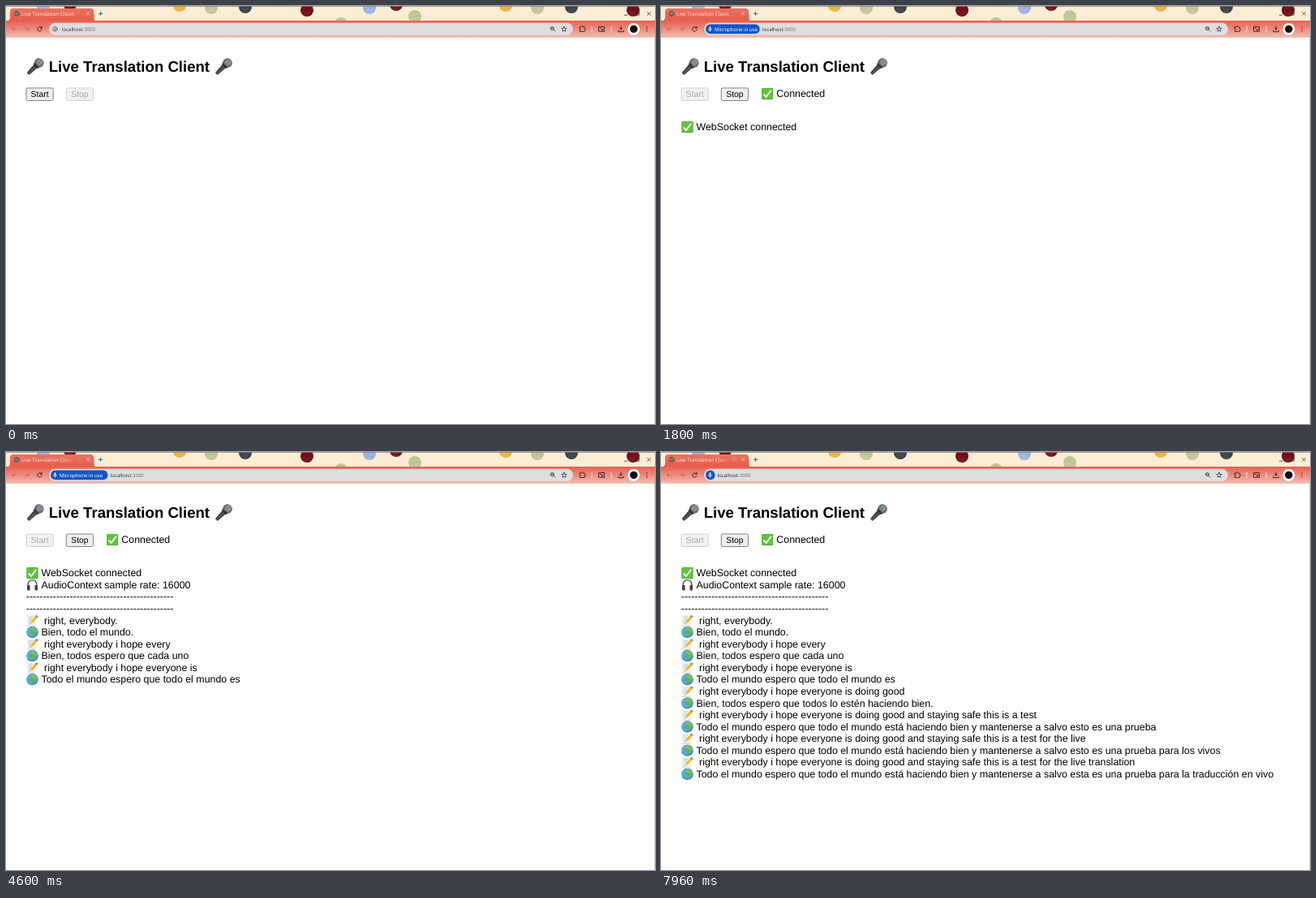
Write an HTML page that moves like this. It is 800 px wide and 515 px high and loops after 8 s.

```html
<!DOCTYPE html>
<html lang="en">
<head>
<meta charset="utf-8">
<title>Live Translation Client</title>
<style>
html, body { margin: 0; width: 100%; height: 100%; overflow: hidden; background: #fefefd; }
svg { display: block; width: 100%; height: 100%; }
text { white-space: pre; text-rendering: geometricPrecision; }
.page { font-family: "Liberation Sans", Arial, sans-serif; font-size: 12.4px; fill: #000; }
.ui { font-family: "Noto Sans", "Open Sans", sans-serif; }
.icon { fill: none; stroke: #33292a; stroke-width: 1; stroke-linecap: round; stroke-linejoin: round; }
</style>
</head>
<body>
<svg viewBox="0 0 800 515">
  <defs>
    <linearGradient id="bar" x2="0" y2="1">
      <stop stop-color="#e7604f"/><stop offset=".5" stop-color="#ee8c7f"/><stop offset="1" stop-color="#f4bdb4"/>
    </linearGradient>
    <linearGradient id="tab" x2="0" y2="1">
      <stop stop-color="#ee7160"/><stop offset="1" stop-color="#e65c4a"/>
    </linearGradient>
    <linearGradient id="fade" gradientUnits="userSpaceOnUse" x1="70" x2="84" y1="0" y2="0">
      <stop stop-color="#fbe6df"/><stop offset="1" stop-color="#fbe6df" stop-opacity="0"/>
    </linearGradient>
    <filter id="shadow" x="-10%" y="-10%" width="120%" height="125%">
      <feDropShadow dx="0" dy="1" stdDeviation="1.3" flood-opacity=".45"/>
    </filter>
    <clipPath id="chipClip"><rect id="chipMask" x="55" y="22" width="12" height="13"/></clipPath>
    <clipPath id="strip"><rect width="800" height="18"/></clipPath>
    <symbol id="mic" viewBox="0 0 22 22">
      <path d="M9.6 8.2 14 12.6 3.4 21.4 .6 18.8Z" fill="#3c4246"/>
      <path d="M10.5 9.5 12 11 3 19.5" fill="none" stroke="#737b80" stroke-width=".9"/>
      <circle cx="15.7" cy="6.6" r="5.9" fill="#697075"/>
      <circle cx="16.6" cy="5.4" r="3.6" fill="#9a9fa2"/>
      <path d="M12 2.5 20 10M14.5 1.2 21.2 7.4M20 2.2 12.2 10M16.8 1 10.6 6.6" stroke="#555b60" stroke-width=".6"/>
      <path d="M9.8 6.3 16 12.6 13.8 13.4 9 8.6Z" fill="#292e31"/>
    </symbol>
    <symbol id="check" viewBox="0 0 16 16">
      <rect x=".3" y=".3" width="15.4" height="15.4" rx="1.6" fill="#4fae35"/>
      <rect x=".8" y=".6" width="14.2" height="13.8" rx="1.3" fill="#62c240"/>
      <path d="M3 8.6 6.3 12.2 13 3.4" fill="none" stroke="#fff" stroke-width="2"/>
    </symbol>
    <symbol id="phones" viewBox="0 0 16 16">
      <path d="M2.3 10V7.3a5.7 5.7 0 0 1 11.4 0V10" fill="none" stroke="#4a5358" stroke-width="1.5"/>
      <rect x="1" y="8.3" width="4.2" height="7" rx="1.6" fill="#3a4146"/>
      <rect x="10.8" y="8.3" width="4.2" height="7" rx="1.6" fill="#3a4146"/>
      <path d="M4.7 9.2v5M11.3 9.2v5" stroke="#9aa5ab" stroke-width="1"/>
    </symbol>
    <symbol id="memo" viewBox="0 0 16 16">
      <path d="M.8.8H12.4V15.4H.8Z" fill="#eef1f3"/>
      <path d="M.8 15H12.4" stroke="#c3ccd1" stroke-width=".8"/>
      <path d="M3 4h6M3 6.5h5M3 9h3M3 11.5h2" stroke="#a9bac3" stroke-width=".7"/>
      <path d="M14 2.6 6.9 10.5" stroke="#ffb31a" stroke-width="3.2"/>
      <path d="M14.6 2 13.3 3.4" stroke="#ef6a68" stroke-width="3.2"/>
      <path d="M13.3 3.4 12.7 4.1" stroke="#8ea1ab" stroke-width="3.2"/>
      <path d="M5.7 9.4 8.1 11.6 4.7 12.9Z" fill="#f2c99b"/>
      <path d="M5.1 11.9 5.8 12.5 4.7 12.9Z" fill="#333"/>
    </symbol>
    <symbol id="globe" viewBox="0 0 16 16">
      <circle cx="8" cy="8" r="7.7" fill="#2f8ad2"/>
      <circle cx="7.4" cy="7.4" r="6.5" fill="#52b0ea"/>
      <path d="M4.4 6.4 6.8 5.6 10.4 6.3 11.6 8.7 12.9 8.9 10.9 11.2 10.3 13.6 9 14.6 8 12.4 7.8 10.4 5 10.2 3.7 8.6Z" fill="#70ad43"/>
      <path d="M5 4.8 5.7 2.6 8.5.8 12.3 1.9 14.9 5.2 14.8 7.6 12.7 7.9 10.9 5.5 8.2 4.1 6.3 4.9Z" fill="#80b84d"/>
      <path d="M7.4 3.3 9 2.2 8.6 3.6ZM8.5 5 11 5.2 9.6 5.7Z" fill="#b9def2"/>
    </symbol>
  </defs>

  <rect width="800" height="515" fill="#fefefd"/>
  <path d="M799.5 39V515" stroke="#d8d8d8"/>

  <rect width="800" height="18" fill="#fbeed5"/>
  <g id="balls" clip-path="url(#strip)"></g>
  <path d="M0 .5H800" stroke="#857d85" opacity=".7"/>
  <path d="M1 18.5Q5 18 5 14V7Q5 3 9 3H104Q108 3 108 7V14Q108 18 112 18.5Z" fill="url(#tab)"/>
  <rect y="18" width="800" height="21" fill="url(#bar)"/>
  <g class="icon">
    <circle cx="13" cy="9.3" r="3.1" fill="#6f6a68" stroke="#5e4b49" stroke-width=".7"/>
    <path d="M10.8 8.4 13 10 15 8" stroke="#b9a9a4" stroke-width=".7"/>
    <path d="M99.4 7.7l3.2 3.2m0-3.2-3.2 3.2" stroke="#fbe6df" stroke-width=".8"/>
    <path d="M114.4 9.3h4.4m-2.2-2.2v4.4" stroke="#1f6fa0"/>
    <path d="M762.5 11.2h3.2M776.6 7.4h3.8v3.8h-3.8ZM790.7 7.6l3.6 3.6m0-3.6-3.6 3.6" stroke-width=".8"/>
    <path d="M13 28.4H7.6m2.3-2.4-2.4 2.4 2.4 2.4M23 28.4h5.4m-2.3-2.4 2.4 2.4-2.4 2.4" stroke="#9d554c" opacity=".65" stroke-width=".8"/>
    <path d="M43.7 26.9a2.7 2.7 0 1 0 .4 2.3M44.2 25.2v2h-2"/>
  </g>
  <text id="title" class="ui" x="19" y="11.5" font-size="6.3">Live Translation Client</text>
  <g id="rec">
    <circle cx="90" cy="9.3" r="2.8" fill="none" stroke="#fbd3ca" stroke-width=".6"/>
    <circle cx="90" cy="9.3" r="1.4" fill="#fbd3ca"/>
  </g>

  <rect x="53" y="20.8" width="646" height="15.2" rx="7.6" fill="#dedddf"/>
  <g id="info" class="icon">
    <circle cx="60.5" cy="28.4" r="2.7" stroke-width=".7"/>
    <path d="M60.5 28.2v1.4M60.5 27v.05" stroke-width=".8"/>
  </g>
  <g id="chip">
    <rect id="chipBody" x="55" y="22.6" width="12" height="11.6" rx="5.8"/>
    <g id="chipMic" fill="none" stroke-width=".8">
      <path d="M60.5 26.2v2.2" stroke-width="1.7" stroke-linecap="round"/>
      <path d="M58.6 28.3a1.9 1.9 0 0 0 3.8 0M60.5 30.3v1.2"/>
    </g>
    <text id="chipText" class="ui" x="66" y="30.5" font-size="6.1" clip-path="url(#chipClip)"></text>
  </g>
  <text id="url" class="ui" x="69" y="30.5" font-size="6.05" fill="#333">localhost<tspan fill="#6f6f72">:3000</tspan></text>
  <g class="icon">
    <circle cx="673.3" cy="27.6" r="2.1" stroke-width=".8"/>
    <path d="M675 29.3l1.8 1.8M672.4 27.6h1.8" stroke-width=".8"/>
    <path d="M688 25.2l.9 2.1 2.3.2-1.7 1.5.5 2.2-2-1.2-2 1.2.5-2.2-1.7-1.5 2.3-.2Z" stroke-width=".8"/>
    <path d="M707.2 26h1.8q0-1.4 1.2-1.4t1.2 1.4h1.8v1.8q1.3 0 1.3 1t-1.3 1v1.6h-6v-1.7q1.3 0 1.3-1t-1.3-1Z" stroke-width=".9"/>
    <path d="M733.5 31.2h-3v-5.6h7v2M735 28.8h2.6v2.6H735ZM732.2 27.5h1.2"/>
    <path d="M722 25v7M746 25v7" stroke="#f8d4cd" stroke-width="1.2"/>
    <path d="M758 25v4m-1.8-1.7 1.8 1.8 1.8-1.8M754.8 30v1.7h6.4V30"/>
  </g>
  <circle cx="773.8" cy="28.4" r="7.5" fill="#fff"/>
  <circle cx="773.8" cy="28.4" r="4.7" fill="#160b0b"/>
  <path d="M790 25.8v.01M790 28.4v.01M790 31v.01" stroke="#33292a" stroke-width="1.5" stroke-linecap="round"/>

  <g class="page">
    <use href="#mic" x="25" y="63.5" width="22" height="22"/>
    <text x="52.7" y="80.6" font-size="18.6" font-weight="700">Live Translation Client</text>
    <use href="#mic" x="257.3" y="63.5" width="22" height="22"/>
    <g id="start"></g>
    <g id="stop"></g>
    <g id="status">
      <use href="#check" x="123.8" y="100.7" width="14.8" height="14.8"/>
      <text x="142.3" y="112.2">Connected</text>
    </g>
    <g id="log"></g>
  </g>

  <g id="popup" class="ui" font-size="6.75" font-weight="500">
    <rect x="53.3" y="36.8" width="142" height="124.4" rx="6" fill="#fff" filter="url(#shadow)"/>
    <text x="62.3" y="53" font-size="8.05" font-weight="600" fill="#1f1f1f">http://localhost:3000</text>
    <text x="62.3" y="64" font-size="8.05" fill="#1f1f1f">wants to</text>
    <path class="icon" d="M180.9 48l3.8 3.8m0-3.8-3.8 3.8"/>
    <g fill="none" stroke="#5f6368" stroke-width=".8">
      <path d="M66.8 76.4v2.3" stroke-width="2" stroke-linecap="round"/>
      <path d="M64.7 78.5a2.1 2.1 0 0 0 4.2 0M66.8 80.6v1.4"/>
    </g>
    <text x="74.5" y="81" font-size="6.65" font-weight="400" fill="#5a5c60">Use your microphones</text>
    <g id="choices"></g>
  </g>
</svg>
<script>
const LOOP = 8000;
const CLICK = 840, ASK = 880, GRANT = 1720, SHRINK = 4680;
const $ = id => document.getElementById(id);
const set = (el, attrs) => { for (const k in attrs) el.setAttribute(k, attrs[k]); };
const show = (el, on) => set(el, { visibility: on ? "visible" : "hidden" });
const ramp = (t, from, length) => {
  const p = Math.min(1, Math.max(0, (t - from) / length));
  return p * p * (3 - 2 * p);
};
const mix = (a, b, p) => a + (b - a) * p;

// Tab strip decoration repeats horizontally
const balls = [[214, -1, "#eeb23d"], [253, 2, "#bfc799"], [295, 1, "#394247"], [371, 5, "#750d1b"],
  [413, 22, "#bfc799"], [448, 2, "#9eb2df"], [481, -2, "#750d1b"], [504, 13, "#bfc799"]];
const ball = (x, y, color) => `<circle cx="${x}" cy="${y}" r="8" fill="${color}"/>
  <path d="M${x - 5} ${y + 2}q4 3 9 0M${x - 4} ${y + 5}q4 2 7 0" fill="none" stroke="#fff" stroke-opacity=".12"/>`;
$("balls").innerHTML = [-402, 0, 402].flatMap(dx => balls.map(([x, y, c]) => ball(x + dx, y, c))).join("");

$("choices").innerHTML = ["Allow while visiting the site", "Allow this time", "Never allow"].map((label, i) =>
  `<rect x="62.3" y="${91 + i * 21.5}" width="124" height="17.8" rx="8.9" fill="#d2e1f4"/>
   <text x="124.3" y="${102.3 + i * 21.5}" text-anchor="middle" fill="#10284f">${label}</text>`).join("");
const firstChoice = $("choices").firstElementChild;

for (const [id, x, label] of [["start", 25, "Start"], ["stop", 74.3, "Stop"]]) {
  $(id).innerHTML = `<rect x="${x}" y="101" width="33.2" height="15.5" rx="1.8" stroke-width=".9"/>
    <text x="${x + 16.6}" y="112.4" font-size="10.4" text-anchor="middle">${label}</text>`;
}
function paintButton(id, enabled, hover) {
  const [box, label] = $(id).children;
  set(box, { fill: enabled ? (hover ? "#e2e2e2" : "#efefef") : "#f1f1f0", stroke: enabled ? "#777" : "#cfcfcf" });
  set(label, { fill: enabled ? "#000" : "#a9a9a9" });
}

const dashes = "-".repeat(44);
const hope = "right everybody i hope everyone is";
const safe = hope + " doing good and staying safe this is a test";
const todos = "Todo el mundo espero que todo el mundo";
const salvo = todos + " está haciendo bien y mantenerse a salvo";
const pairs = [
  [3600, "right, everybody.", "Bien, todo el mundo."],
  [4040, "right everybody i hope every", "Bien, todos espero que cada uno"],
  [4560, hope, todos + " es"],
  [5080, hope + " doing good", "Bien, todos espero que todos lo estén haciendo bien."],
  [6600, safe, salvo + " esto es una prueba"],
  [7160, safe + " for the live", salvo + " esto es una prueba para los vivos"],
  [7520, safe + " for the live translation", salvo + " esta es una prueba para la traducción en vivo"]
];
const lines = [
  [ASK, "check", "WebSocket connected"],
  [1880, "phones", "AudioContext sample rate: 16000"],
  [1880, "", dashes],
  [1880, "", dashes],
  ...pairs.flatMap(([at, heard, translated]) => [[at, "memo", heard], [at, "globe", translated]])
];
$("log").innerHTML = lines.map(([, icon, words], i) => {
  const y = 153.3 + i * 14.57;
  const x = icon === "memo" ? 47 : icon ? 43.5 : 24.8;
  const mark = icon ? `<use href="#${icon}" x="25" y="${y - 11.7}" width="15" height="15"/>` : "";
  return `<g>${mark}<text x="${x}" y="${y}">${words}</text></g>`;
}).join("");
const rows = [...$("log").children];

function paintChip(t) {
  const granted = t >= GRANT + 40;
  const width = granted
    ? mix(mix(66, 70.5, ramp(t, GRANT + 40, 160)), 11.6, ramp(t, SHRINK, 240))
    : mix(11.6, 66, ramp(t, ASK - 40, 200));
  const ink = granted ? "#fff" : "#222";
  show($("chip"), t >= CLICK);
  show($("info"), t < CLICK);
  set($("chipBody"), { width, fill: granted ? "#1456c4" : "#c5c5c8" });
  set($("chipMask"), { width: width - 2 });
  set($("chipMic"), { stroke: ink });
  set($("chipText"), { fill: ink, "font-weight": granted ? 500 : 600 });
  $("chipText").textContent = granted ? "Microphone in use" : "Use microphone?";
  set($("url"), { x: t < CLICK ? 69 : 55 + width + mix(3.3, 2.9, ramp(t, SHRINK, 240)) });
}

function draw(t) {
  const clicked = t >= CLICK;
  const recording = t >= GRANT + 120;
  paintButton("start", !clicked, t >= 400);
  paintButton("stop", clicked, false);
  show($("status"), t >= ASK);
  rows.forEach((row, i) => show(row, t >= lines[i][0]));

  show($("popup"), t >= ASK && t < GRANT);
  set($("popup"), { opacity: ramp(t, ASK - 40, 160) });
  set(firstChoice, { fill: t >= 1200 ? "#c3d4eb" : "#d2e1f4" });

  paintChip(t);
  set($("title"), { fill: recording ? "url(#fade)" : "#fbe6df" });
  show($("rec"), recording);
  set($("rec"), { opacity: 0.27 - 0.17 * Math.cos((t - 2560) / 2000 * 2 * Math.PI) });
}

function tick() {
  draw(performance.now() % LOOP);
  requestAnimationFrame(tick);
}
tick();
</script>
</body>
</html>
```
